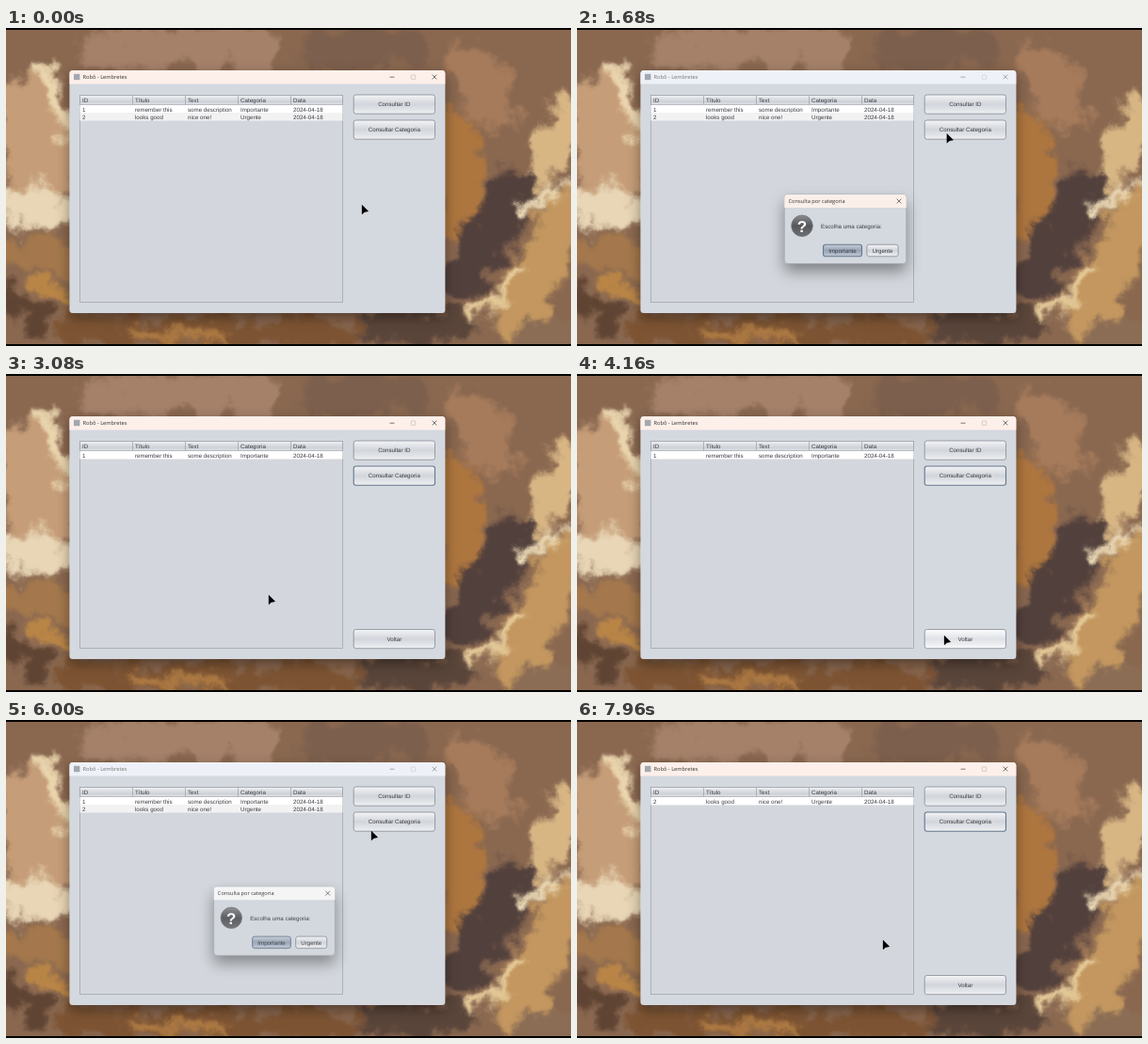
Recreate the animation shown at these times as an HTML page. Size 600x338 px, loop 8 s.

```html
<!DOCTYPE html>
<html lang="pt">
<meta charset="utf-8">
<title>Lembretes</title>
<style>
html, body { margin: 0; width: 100%; height: 100%; overflow: hidden; background: #000 }
svg { position: absolute; left: 0; top: 0; width: 600px; height: 338px; will-change: transform }
text { font: 6.2px "Liberation Sans", Arial, sans-serif; fill: #3a3c42; text-rendering: geometricPrecision }
.title { font: 5.7px "Open Sans", "Noto Sans", sans-serif; fill: #333 }
.mid { text-anchor: middle }
.icon { fill: none; stroke: #444; stroke-width: .7 }
.line { fill: none; stroke: #9b9fa7; stroke-width: .7 }
.button rect { fill: url(#normal); stroke: #858b95; stroke-width: .8 }
.button.default rect { fill: url(#default); stroke: #5d6b7e }
.button.hover rect { fill: url(#hover) }
.button.default.hover rect { fill: url(#defaultHover) }
.button.pressed rect { fill: url(#pressed) !important }
.button.focus rect { stroke: #64778c; stroke-width: 1.1 }
.inactive .title { fill: #777 }
.inactive .icon { stroke: #888 }
</style>
<svg id="sky" viewBox="0 0 600 338"></svg>
<svg id="stage" viewBox="0 0 600 338"></svg>
<script>
const LOOP = 8000;
const $ = id => document.getElementById(id);

let seed = 5;
const random = () => (seed = seed * 16807 % 2147483647) / 2147483647;

// Wallpaper: a bank of cloud is a run of seeded puffs between two points
function bank(color, x0, y0, x1, y1, r) {
  const count = Math.ceil(Math.hypot(x1 - x0, y1 - y0) / r * 1.5) + 1;
  return Array.from({ length: count }, (_, i) => {
    const k = i / (count - 1), spread = () => (random() - .5) * r * .6;
    return `<circle cx="${x0 + (x1 - x0) * k + spread()}" cy="${y0 + (y1 - y0) * k + spread()}"
      r="${r * (.7 + .5 * random())}" fill="${color}"/>`;
  }).join('');
}
const region = 'filterUnits="userSpaceOnUse" x="-40" y="-40" width="680" height="420" color-interpolation-filters="sRGB"';

$('sky').innerHTML = `
  <filter id="paint" ${region}>
    <feTurbulence type="fractalNoise" baseFrequency=".035" numOctaves="5" seed="7" result="noise"/>
    <feGaussianBlur in="SourceGraphic" stdDeviation="3"/>
    <feDisplacementMap in2="noise" scale="42" xChannelSelector="R" yChannelSelector="G"/>
    <feGaussianBlur stdDeviation=".6"/>
  </filter>
  <rect width="600" height="338" fill="#8a6850"/>
  <g filter="url(#paint)">
    ${bank('#a5816a', 110, 22, 270, 22, 22)}
    ${bank('#7c5f4d', 340, 24, 430, 20, 18)}
    ${bank('#a67b5b', 490, 35, 525, 90, 26)}
    ${bank('#c59d78', 20, 70, 45, 150, 36)}
    ${bank('#ead5ae', 42, 40, 62, 110, 8)}
    ${bank('#e8d6b6', 5, 190, 62, 195, 18)}
    ${bank('#a4784c', 0, 240, 60, 245, 18)}
    ${bank('#b98546', 30, 270, 65, 290, 11)}
    ${bank('#5f4433', 0, 288, 35, 312, 12)}
    ${bank('#7d5433', 70, 320, 360, 322, 14)}
    ${bank('#b07c44', 130, 322, 240, 328, 5)}
    ${bank('#ae763f', 475, 120, 480, 205, 24)}
    ${bank('#52403c', 540, 180, 485, 275, 26)}
    ${bank('#5a453a', 390, 322, 490, 318, 16)}
    ${bank('#c3975f', 595, 195, 540, 305, 26)}
    ${bank('#d8b684', 595, 85, 565, 150, 20)}
    ${bank('#efddb8', 590, 170, 545, 195, 6)}
    ${bank('#e6cc9b', 545, 255, 500, 312, 6)}
    ${bank('#8b6d55', 550, 330, 600, 322, 13)}
  </g>
  <path d="M0 0H600V2H0ZM0 336H600V338H0Z"/>`;

// Widgets
const gradient = (id, ...colors) =>
  `<linearGradient id="${id}" x2="0" y2="1">${colors.map((c, i) =>
    `<stop offset="${i / (colors.length - 1)}" stop-color="${c}"/>`).join('')}</linearGradient>`;
const shadow = (id, dy, blur) => `<filter id="${id}" x="-30%" y="-30%" width="160%" height="190%">
  <feDropShadow dx="0" dy="${dy}" stdDeviation="${blur}" flood-opacity=".4"/></filter>`;
const label = (x, y, s, cls = '') => `<text x="${x}" y="${y}" class="${cls}">${s}</text>`;
const button = (id, x, y, w, h, s, cls = '') => `<g id="${id}" class="button ${cls}">
  <rect x="${x}" y="${y}" width="${w}" height="${h}" rx="2.5"/>
  ${label(x + w / 2, y + h / 2 + 2.2, s, 'mid')}</g>`;
const sideButton = (id, y, s) => button(id, 369.2, y, 86.3, 20.2, s);
const cells = names => names.map((s, i) => label(81 + 56 * i, 78.7, s)).join('');
const row = (id, names) => `<g id="${id}"><rect x="78.5" y="71.9" width="279" height="8.5"/>${cells(names)}</g>`;
const cross = (x, y) => `<path class="icon" d="M${x - 2.4} ${y - 2.4}l4.8 4.8m0-4.8l-4.8 4.8"/>`;
const bar = (id, x, y, w, h) => `<path id="${id}"
  d="M${x} ${y + h}v${3.5 - h}q0-3.5 3.5-3.5h${w - 7}q3.5 0 3.5 3.5v${h - 3.5}Z"/>`;

$('stage').innerHTML = `
  <defs>
    ${gradient('normal', '#f4f5f7', '#e2e4e8', '#d2d5db', '#dfe2e6', '#eff0f2')}
    ${gradient('hover', '#fcfcfd', '#edeff2', '#dfe2e7', '#eaecef', '#fafafb')}
    ${gradient('pressed', '#8f9aa9', '#7d8a9b', '#8794a6', '#a5b0be')}
    ${gradient('default', '#cbd2dc', '#adb7c5', '#98a5b6', '#abb6c5', '#c3ccd7')}
    ${gradient('defaultHover', '#e1e7ee', '#c6d0dc', '#b4c0d0', '#c5d0dd', '#dbe3ec')}
    ${gradient('header', '#f0f1f3', '#dee1e5', '#ced2d8', '#dfe2e6')}
    ${gradient('ball', '#8a8c90', '#55575b', '#6e7074')}
    ${shadow('windowShadow', 5, 7)}
    ${shadow('dialogShadow', 8, 8)}
  </defs>
  <g id="main">
    <rect x="67.5" y="45" width="398.8" height="258" rx="3.5" fill="#d4d8df" filter="url(#windowShadow)"/>
    ${bar('mainBar', 67.5, 45, 398.8, 14.5)}
    <rect x="72" y="48.8" width="6.4" height="6.4" fill="#a3a8b0"/>
    ${label(81.5, 54, 'Robô - Lembretes', 'title')}
    <path class="icon" d="M407.5 52.2h5"/>
    <rect class="icon" x="430.3" y="50" width="4.4" height="4.4" rx=".6" opacity=".3"/>
    ${cross(455, 52)}
    <rect class="line" x="78.5" y="71.5" width="279" height="220" style="fill:#d3d7dd"/>
    <rect class="line" x="78.5" y="71.5" width="279" height="10.2" style="fill:url(#header)"/>
    <path class="line" d="M134.5 72v9.5m56-9.5v9.5m56-9.5v9.5m56-9.5v9.5"/>
    ${cells(['ID', 'Título', 'Text', 'Categoria', 'Data'])}
    ${row('first', ['1', 'remember this', 'some description', 'Importante', '2024-04-18'])}
    ${row('second', ['2', 'looks good', 'nice one!', 'Urgente', '2024-04-18'])}
    ${sideButton('byId', 71, 'Consultar ID')}
    ${sideButton('byCategory', 98, 'Consultar Categoria')}
    ${sideButton('back', 271.5, 'Voltar')}
  </g>
  <g id="dialog">
    <rect x="220.3" y="177" width="129.4" height="73.5" rx="3.5" fill="#d4d8df" stroke="#8d8f95" stroke-width=".5" filter="url(#dialogShadow)"/>
    ${bar('dialogBar', 220.3, 177, 129.4, 14)}
    ${label(224.5, 186, 'Consulta por categoria', 'title')}
    ${cross(342, 184)}
    <circle cx="239" cy="210.3" r="11.3" fill="url(#ball)" stroke="#77797d" stroke-width=".8"/>
    <text x="239" y="216.6" class="mid" style="font-size:17px;font-weight:bold;fill:#fff">?</text>
    ${label(259, 212.5, 'Escolha uma categoria:')}
    ${button('important', 261.5, 230.2, 41, 12.6, 'Importante', 'default')}
    ${button('urgent', 307.8, 230.2, 33.3, 12.6, 'Urgente')}
  </g>
  <path id="cursor" d="M0 0V10L2.6 7.8 6.8 6.8Z" stroke="#000" stroke-width=".3" stroke-linejoin="round"/>`;

// Pointer moves: from, to (ms), x, y
const moves = [
  [600, 640, 382, 188], [800, 1240, 394, 111], [1640, 2320, 279, 235], [3600, 4140, 390, 278],
  [5000, 5500, 390, 112], [5540, 5680, 388, 118], [6080, 6460, 325, 234]
];
// Each button acts on release, after being held for HOLD ms
const clicks = [['byCategory', 1440], ['important', 2900], ['back', 4570], ['byCategory', 5880], ['urgent', 7140]];
const HOLD = 100, OPEN = 160, CLOSE = 120;

const clamp = v => Math.max(0, Math.min(1, v));
const smooth = v => v * v * (3 - 2 * v);
const set = (id, name, value) => $(id).setAttribute(name, value);
const show = (id, on) => $(id).style.display = on ? '' : 'none';

const pointer = t => moves.reduce(([x, y], [from, to, nx, ny]) => {
  const k = smooth(clamp((t - from) / (to - from)));
  return [x + (nx - x) * k, y + (ny - y) * k];
}, [378, 188]);

function placeRow(id, index, visible) {
  show(id, visible);
  set(id, 'transform', `translate(0 ${10 + 8.1 * index})`);
  $(id).firstElementChild.setAttribute('fill', index ? '#f2f2f3' : '#fff');
}

function render(t) {
  const [x, y] = pointer(t);
  set('cursor', 'transform', `translate(${x} ${y})`);

  const [action, since] = clicks.filter(c => c[1] <= t).pop() || ['back', -LOOP];
  const age = t - since;
  const open = action === 'byCategory', filtered = action === 'important' || action === 'urgent';
  const active = open && age >= OPEN - 20;

  const shown = open ? 1 - (1 - clamp(age / OPEN)) ** 2 : filtered ? 1 - clamp(age / CLOSE) : 0;
  show('dialog', shown > 0);
  set('dialog', 'opacity', shown);
  set('dialog', 'transform', `translate(285 214) scale(${.9 + .1 * shown}) translate(-285 -214)`);
  set('dialogBar', 'fill', active ? '#fbefea' : '#f8f7f8');
  set('main', 'class', open ? 'inactive' : '');
  set('mainBar', 'fill', open ? '#eef1f7' : '#fdefe9');

  placeRow('first', 0, action !== 'urgent');
  placeRow('second', action === 'urgent' ? 0 : 1, action !== 'important');
  show('back', filtered);

  for (const el of document.querySelectorAll('.button')) {
    const b = el.firstElementChild.getBBox();
    const over = x >= b.x && x <= b.x + b.width && y >= b.y && y <= b.y + b.height;
    el.classList.toggle('hover', over && open === $('dialog').contains(el));
    el.classList.toggle('pressed', clicks.some(([id, at]) => id === el.id && t >= at - HOLD && t < at));
  }
  $('byCategory').classList.toggle('focus', filtered);
  $('important').classList.toggle('focus', active);
}

const start = performance.now();
(function frame() {
  render((performance.now() - start) % LOOP);
  requestAnimationFrame(frame);
})();
</script>
</html>
```
